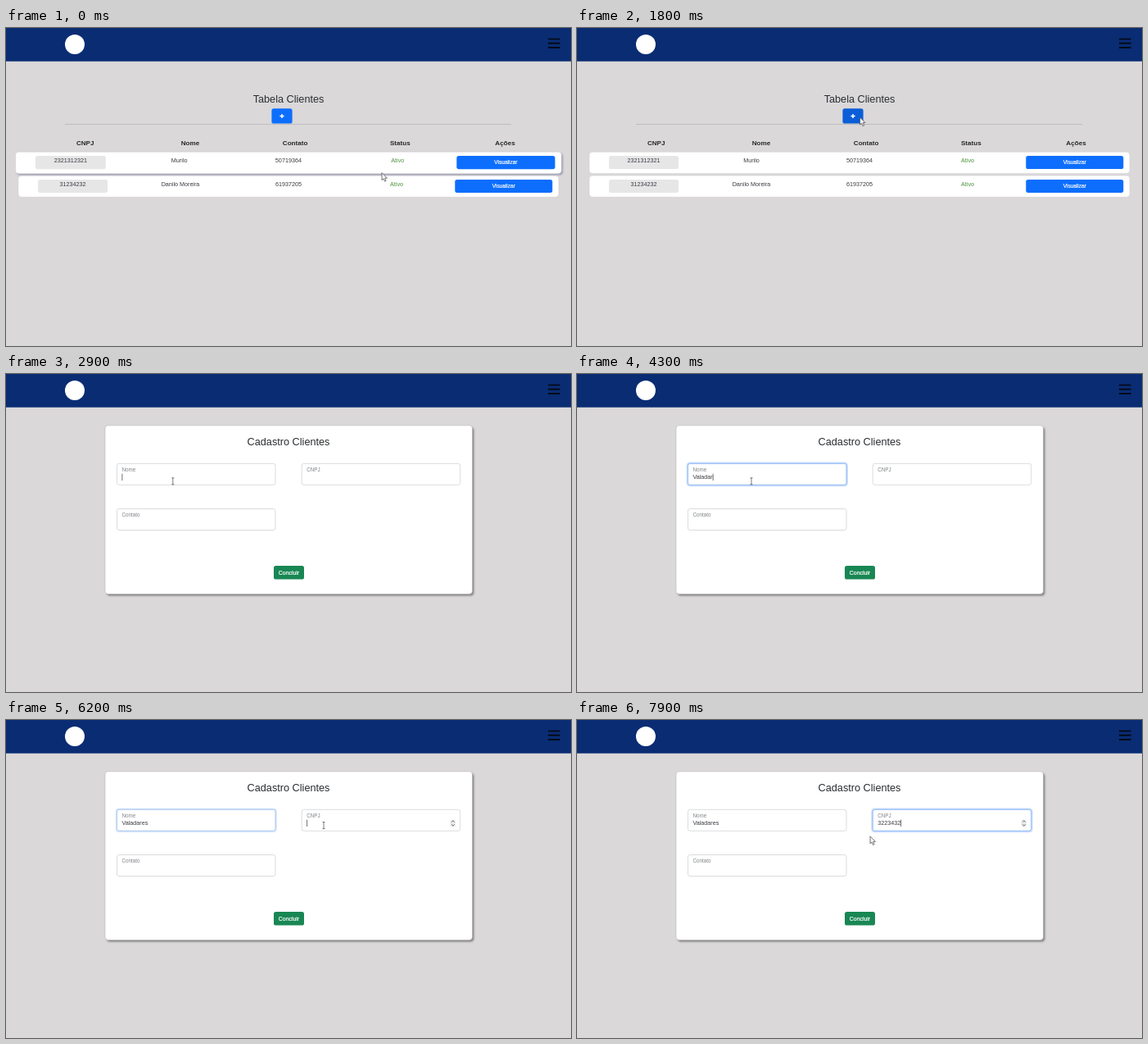
Recreate the animation shown at these times as an HTML page. Size 690 px wide and 388 px high, loop 8 s.

```html
<!DOCTYPE html>
<html lang="pt">
<head>
<meta charset="utf-8">
<title>Clientes</title>
<style>
html, body { margin: 0; width: 100%; height: 100%; overflow: hidden; background: #dad8d9; }
svg { display: block; width: 100vw; height: 100vh; }
text { font-family: "Liberation Sans", Arial, sans-serif; font-size: 7.2px; fill: #3a3c42; white-space: pre; }
.mid { text-anchor: middle; }
.title { font-size: 12.7px; fill: #2a2d31; }
.head { font-size: 8.1px; font-weight: bold; fill: #25272a; }
.ok { fill: #4f9440; }
.btn { fill: #fff; stroke: #fff; stroke-width: .2px; font-size: 6.5px; }
.big { font-size: 6.9px; }
.label { font-size: 6.3px; fill: #808489; }
.box { fill: #fff; stroke: #d0d3d6; stroke-width: .8px; }
.ring { fill: none; stroke: #0d6efd; stroke-opacity: .23; stroke-width: 1.8px; }
.edge { fill: none; stroke: #8fbcfe; stroke-width: .8px; }
</style>
</head>
<body>
<svg id="stage" viewBox="0 0 690 388" preserveAspectRatio="none">
  <defs><filter id="soft"><feGaussianBlur stdDeviation=".8"/></filter></defs>
  <rect width="690" height="388" fill="#dad8d9"/>
  <rect width="690" height="40.7" fill="#092c73"/>
  <circle cx="84" cy="20" r="12" fill="#fff"/>
  <path d="M662 13.5h14.5M662 18.7h14.5M662 23.9h14.5" stroke="#05070d" stroke-width="1.7"/>

  <g id="list">
    <text class="mid title" x="345" y="91.1">Tabela Clientes</text>
    <path d="M72 117.5H617" stroke="#bebcbd"/>
    <rect id="add" x="324.4" y="98.3" width="25.2" height="18.2" rx="2.6"/>
    <path d="M334.4 107.5h5.2M337 104.9v5.2" stroke="#fff" stroke-width="1.5"/>
    <g id="heads"></g>
    <g id="rows"></g>
  </g>

  <g id="form">
    <rect x="123" y="65" width="448.3" height="205.6" rx="4" fill="#7f7f7f" filter="url(#soft)"/>
    <rect x="121" y="62.8" width="448.5" height="205.7" rx="4" fill="#fff" stroke="#aaa" stroke-width=".5"/>
    <text class="mid title" x="345" y="87.1">Cadastro Clientes</text>
    <g id="fields"></g>
    <g id="spin">
      <rect x="542.6" y="121.6" width="6.4" height="8.8" rx="1.6" fill="#ececec"/>
      <path d="M543.9 124.7l1.9-1.9 1.9 1.9M543.9 127.3l1.9 1.9 1.9-1.9" fill="none" stroke="#55585c" stroke-width=".9"/>
    </g>
    <rect x="327" y="234" width="37" height="16.5" rx="2.6" fill="#198754"/>
    <text class="mid btn big" x="345.5" y="244.8">Concluir</text>
    <path id="caret" d="M0 121.7v8.3" stroke="#333" stroke-width=".7"/>
  </g>

  <path id="arrow" d="M0 0V9L2 7.2L3.5 10.6L5.1 9.9L3.7 6.6H6.5Z" fill="#f4f4f4" stroke="#444" stroke-width=".7"/>
  <path id="beam" d="M-1.5-4H1.5M-1.5 4H1.5M0-4V4" fill="none" stroke="#444" stroke-width=".7"/>
</svg>
<script>
const LOOP = 8000, STEP = 100;
const $ = id => document.getElementById(id);

// Pointer stops: time, x, y
const path = [
  [0, 459, 176.6], [900, 459, 176.6], [1800, 345.5, 109], [2000, 345.5, 109],
  [2100, 346, 111], [2900, 203.8, 130.8], [3100, 213, 130.8], [5000, 213, 130.8],
  [5900, 386, 139], [6100, 388, 128.6], [7200, 388, 128.6], [7500, 386.5, 130.5],
  [7600, 386.5, 130.5], [7900, 358, 141.8]
];
const typed = {
  name: { text: "Valadares", at: [3600, 3800, 3900, 4000, 4100, 4200, 4300, 4600, 4700] },
  code: { text: "3223432", at: [6600, 6800, 6900, 7000, 7100, 7300, 7700] }
};

const text = (cls, x, y, s) => `<text class="${cls}" x="${x}" y="${y}">${s}</text>`;

function row(id, y, code, name, phone) {
  return `<g id="${id}">
    <rect class="shade" x="16.6" y="${y + 1.6}" width="660" height="26.2" rx="4" fill="#8888a6" filter="url(#soft)" opacity="0"/>
    <rect x="15" y="${y}" width="660" height="26.2" rx="4" fill="#fff" stroke="#cfcdd0" stroke-width=".5"/>
    <rect x="39" y="${y + 4.8}" width="85" height="16" rx="2.6" fill="#e6e6e7"/>
    <rect x="548.3" y="${y + 4.8}" width="119" height="16" rx="2.6" fill="#0d6efd"/>
    ${text("mid", 81.5, y + 12.4, code)}${text("mid", 213, y + 12.4, name)}
    ${text("mid", 345, y + 12.4, phone)}${text("mid ok", 477, y + 12.4, "Ativo")}
    ${text("mid btn", 607.8, y + 14.8, "Visualizar")}</g>`;
}

function field(id, x, y, label) {
  const r = `x="${x}" y="${y}" width="193.5" height="26" rx="2.6"`;
  return `<rect class="box" ${r}/><g id="${id}Focus">
    <rect class="ring" x="${x - 1}" y="${y - 1}" width="195.5" height="28" rx="3.4"/>
    <rect class="edge" ${r}/></g>
    ${text("label", x + 6, y + 9.8, label)}<text id="${id}" x="${x + 6}" y="${y + 19.1}"></text>`;
}

$("heads").innerHTML = ["CNPJ", "Nome", "Contato", "Status", "Ações"]
  .map((s, i) => text("mid head", 96.7 + i * 128.2, 143, s)).join("");
$("rows").innerHTML = row("second", 180.1, "31234232", "Danilo Moreira", "61937205") +
  row("first", 151.3, "2321312321", "Murilo", "50719364");
$("fields").innerHTML = field("name", 135.5, 109.3, "Nome") +
  field("code", 361.2, 109.3, "CNPJ") + field("phone", 135.5, 164.5, "Contato");

const clamp = v => Math.max(0, Math.min(1, v));
const ease = v => v * v * (3 - 2 * v);
const ramp = (t, from, span) => clamp((t - from) / span);
const show = (id, on) => $(id).setAttribute("visibility", on ? "inherit" : "hidden");
const fade = (id, v) => $(id).setAttribute("opacity", v);
const move = (id, x, y) => $(id).setAttribute("transform", `translate(${x} ${y})`);
const shade = $("first").querySelector(".shade");
fade("phoneFocus", 0);

function pointer(t) {
  const i = path.findIndex(p => p[0] > t);
  if (i < 0) return path[path.length - 1].slice(1);
  const [a, b] = [path[i - 1], path[i]];
  const k = ease((t - a[0]) / (b[0] - a[0]));
  return [a[1] + (b[1] - a[1]) * k, a[2] + (b[2] - a[2]) * k];
}

function draw(t) {
  const onForm = t >= 2100;
  const [x, y] = pointer(t);
  show("list", !onForm);
  show("form", onForm);

  const lift = 1 - ease(ramp(t, 1300, 200));
  const s = 1 + .01 * lift;
  $("first").setAttribute("transform", `translate(345 164.4) scale(${s}) translate(-345 -164.4)`);
  shade.setAttribute("opacity", lift * .85);
  const overAdd = x > 324 && x < 350 && y > 98 && y < 117;
  $("add").setAttribute("fill", overAdd ? "#0b5ed7" : "#0d6efd");

  for (const id in typed) {
    const { text, at } = typed[id];
    $(id).textContent = text.slice(0, at.filter(v => v <= t).length);
  }
  const onCode = t >= 6200;
  fade("nameFocus", ramp(t, 2900, 150) - ramp(t, 6150, 150));
  fade("codeFocus", ramp(t, 6200, 100));
  show("spin", t >= 6000);

  const active = $(onCode ? "code" : "name");
  const width = active.textContent ? active.getComputedTextLength() : 0;
  const blink = (t >= 3400 && t < 3600) || (t >= 5200 && t < 5700);
  show("caret", onForm && t >= 2900 && !blink);
  move("caret", +active.getAttribute("x") + width + .4, 0);

  const inField = onForm && y > 109 && y < 135.4 && (x > 135 && x < 329 || x > 361 && x < 555);
  show("beam", inField);
  show("arrow", !inField);
  move(inField ? "beam" : "arrow", x, y);
}

const start = performance.now();
function tick() {
  const t = (performance.now() - start) % LOOP;
  draw(Math.floor(t / STEP) * STEP);
  requestAnimationFrame(tick);
}
tick();
</script>
</body>
</html>
```
